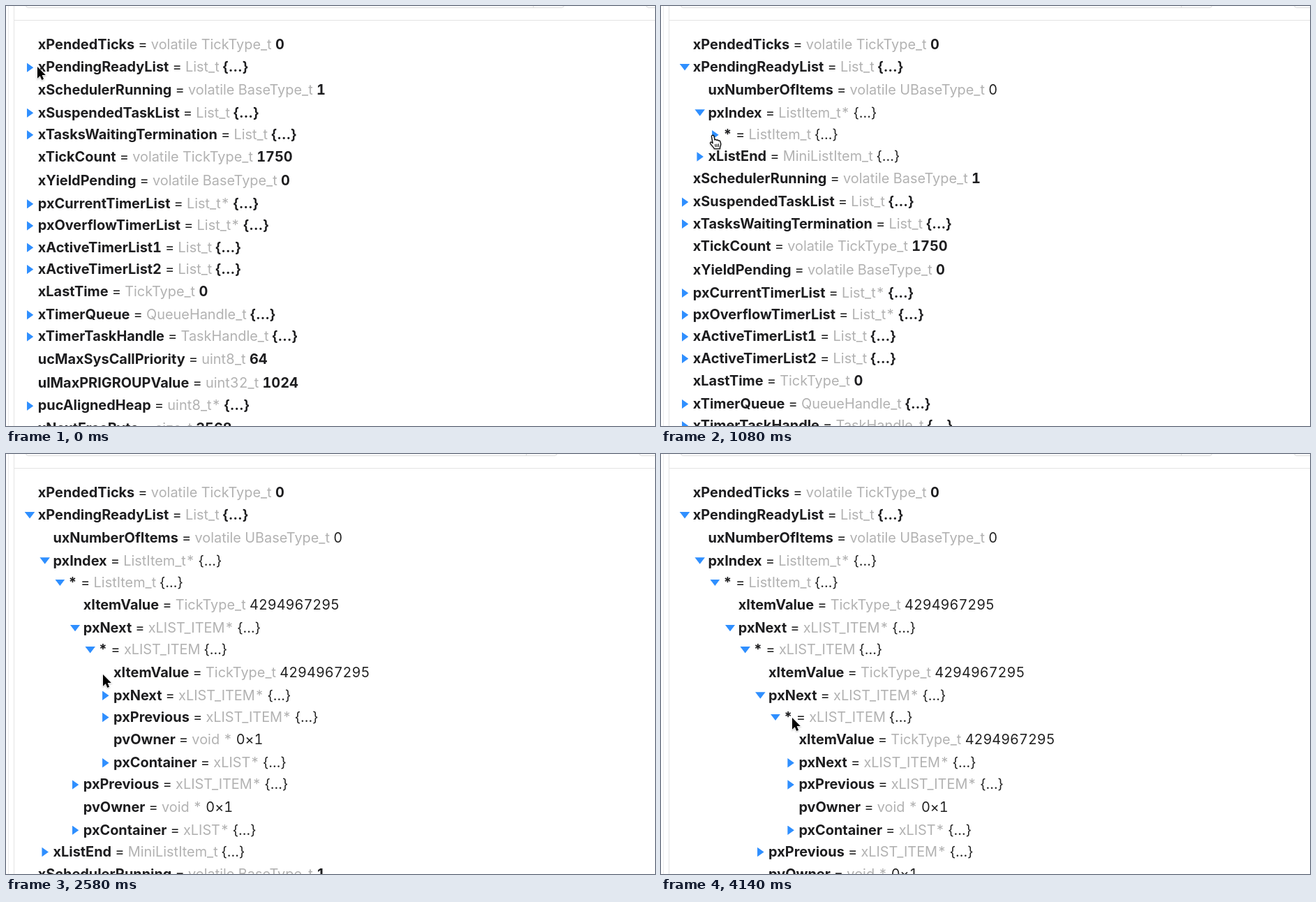
An HTML page for the animation above (4200 ms loop, 930 by 602 pixels).

```html
<!DOCTYPE html>
<html lang="en">
<head>
<meta charset="utf-8">
<title>Variable tree</title>
<style>
  html, body { margin: 0; width: 100%; height: 100%; overflow: hidden; background: #fff; }
  #stage { position: relative; width: 930px; height: 602px; overflow: hidden; background: #fff; }
  .line, .box { position: absolute; box-sizing: border-box; }
  .line { background: #e4e4e4; }
  .box { top: -30px; height: 33px; border: 1.5px solid #dcdcdc; border-radius: 4px; }
  #field { left: 28px; width: 772px; }
  #field i { position: absolute; right: 0; top: 0; bottom: 0; width: 43px; border-left: 1.5px solid #dcdcdc; }
  #side { left: 917px; width: 60px; }
  .narrow #field { width: 762px; }
  .narrow #side { left: 907px; }

  #tree {
    position: absolute; left: 45.8px; top: 38.5px; white-space: nowrap; color: #222;
    font: 400 19.9px Inter, "Open Sans", sans-serif;
    font-variant-numeric: tabular-nums;
    font-variant-ligatures: no-contextual;
  }
  .row { position: relative; height: 33.9px; line-height: 33.9px; }
  .parent { height: 31.3px; line-height: 31.3px; }
  .row b { font-weight: 700; color: #1d1d1f; }
  .type { color: #b2b2b2; }
  .kids { display: none; margin-left: 21.67px; }
  .open > .kids { display: block; }
  .parent::before {
    content: ""; position: absolute; left: -16px; top: 9px; width: 9.5px; height: 13.5px;
    background: #2f8fff; clip-path: polygon(0 0, 100% 50%, 0 100%);
  }
  .open > .parent::before {
    left: -19px; top: 10.7px; width: 14.5px; height: 9.5px;
    clip-path: polygon(0 0, 100% 0, 50% 100%);
  }
  #cursor { position: absolute; left: 0; top: 0; overflow: visible; filter: drop-shadow(0 1px 1px #0004); }
</style>
</head>
<body>
<div id="stage">
  <div class="line" style="left:3px;top:0;width:1px;height:602px;background:#ececec"></div>
  <div class="line" style="left:11px;top:0;width:1px;height:602px"></div>
  <div class="line" style="left:12px;top:20px;width:918px;height:1px"></div>
  <div class="box" id="field"><i></i></div>
  <div class="box" id="side"></div>
  <div id="tree"></div>
  <svg id="cursor" width="20" height="24">
    <path id="arrow" d="M0 0V16.8L3.8 13.2L6.3 19L9 17.8L6.6 12.1H11.8Z" fill="#000" stroke="#fff" stroke-width="1.3" paint-order="stroke"/>
    <g id="hand" transform="translate(-5 -1)" fill="#fff" stroke="#111" stroke-width="1.4" stroke-linejoin="round" stroke-linecap="round">
      <path d="M5 1.2C6.3 1 6.9 2 7.1 3L8 8C8.4 7 10.2 7.1 10.5 8.4C11.3 7.6 12.8 7.9 13.1 9.1C14.2 8.5 15.5 9.1 15.8 10.2L16.7 13.4C17 15.4 15.8 17 15.5 18.4V20.6H7.4C7 18.8 4 16.6 2 13.6C.8 11.9 2.3 10.4 3.7 11.5L5.2 12.8L3.5 3.4C3.3 2 4 1.3 5 1.2Z"/>
      <path d="M8.6 14.2L9 17.6M11 14L11.2 17.6M13.4 13.8V17.4" stroke-width="1.1"/>
    </g>
  </svg>
</div>
<script>
const LOOP = 4200, STEP = 60, NARROW_AT = 840;
const $ = id => document.getElementById(id);
const leaf = (name, type, value) => ({ name, type, value });
const node = (name, type, openAt = Infinity, kids = []) => ({ name, type, value: "{…}", openAt, kids });

const item = next => [
  leaf("xItemValue", "TickType_t", "4294967295"),
  next,
  node("pxPrevious", "xLIST_ITEM*"),
  leaf("pvOwner", "void *", "0×1"),
  node("pxContainer", "xLIST*")
];
const nextItem = (openAt, targetAt, next) =>
  node("pxNext", "xLIST_ITEM*", openAt, [node("*", "xLIST_ITEM", targetAt, item(next))]);

const chain = nextItem(1800, 2400, nextItem(3060, 3600, node("pxNext", "xLIST_ITEM*")));

const roots = [
  leaf("xPendedTicks", "volatile TickType_t", "0"),
  node("xPendingReadyList", "List_t", 300, [
    leaf("uxNumberOfItems", "volatile UBaseType_t", "0"),
    node("pxIndex", "ListItem_t*", 840, [node("*", "ListItem_t", 1260, item(chain))]),
    node("xListEnd", "MiniListItem_t")
  ]),
  leaf("xSchedulerRunning", "volatile BaseType_t", "1"),
  node("xSuspendedTaskList", "List_t"),
  node("xTasksWaitingTermination", "List_t"),
  leaf("xTickCount", "volatile TickType_t", "1750"),
  leaf("xYieldPending", "volatile BaseType_t", "0"),
  node("pxCurrentTimerList", "List_t*"),
  node("pxOverflowTimerList", "List_t*"),
  node("xActiveTimerList1", "List_t"),
  node("xActiveTimerList2", "List_t"),
  leaf("xLastTime", "TickType_t", "0"),
  node("xTimerQueue", "QueueHandle_t"),
  node("xTimerTaskHandle", "TaskHandle_t"),
  leaf("ucMaxSysCallPriority", "uint8_t", "64"),
  leaf("ulMaxPRIGROUPValue", "uint32_t", "1024"),
  node("pucAlignedHeap", "uint8_t*"),
  leaf("xNextFreeByte", "size_t", "3568")
];

const toggles = [];

function add(tag, cls, parent, text = "") {
  const el = document.createElement(tag);
  el.className = cls;
  el.textContent = text;
  parent.append(el);
  return el;
}

function build(data, parent, depth) {
  const box = add("div", "", parent);
  const row = add("div", data.kids ? "row parent" : "row", box);
  add("b", "", row, data.name);
  row.append(" = ");
  add("span", "type", row, data.type);
  row.append(" ");
  add(depth ? "span" : "b", "", row, data.value);
  if (!data.kids) return;
  const kids = add("div", "kids", box);
  data.kids.forEach(kid => build(kid, kids, depth + 1));
  if (data.openAt < LOOP) toggles.push([box, data.openAt]);
}
roots.forEach(root => build(root, $("tree"), 0));

// Pointer stops: arrival, departure, x, y, hand shape
const stops = [
  [0, 0, 45, 87, false],
  [120, 420, 37, 88, true],
  [600, 900, 58, 153, true],
  [1020, 1320, 74, 185, true],
  [1560, 1980, 102, 250, true],
  [2220, 2460, 123, 282, true],
  [2580, 2580, 139, 316, false],
  [2760, 3240, 144, 345, true],
  [3420, 3720, 166, 378, true],
  [4140, LOOP, 188, 378, false]
];

function pointer(t) {
  const i = stops.findLastIndex(stop => t >= stop[0]);
  const [, leave, x, y, hand] = stops[i];
  if (t <= leave) return { x, y, hand };
  const [arrive, , nx, ny] = stops[i + 1];
  const p = (t - leave) / (arrive - leave);
  const ease = p * p * (3 - 2 * p);
  return { x: x + (nx - x) * ease, y: y + (ny - y) * ease, hand: false };
}

function draw(now) {
  const t = Math.floor((now % LOOP) / STEP) * STEP;
  for (const [box, at] of toggles) box.classList.toggle("open", t >= at);
  $("stage").classList.toggle("narrow", t >= NARROW_AT);
  const { x, y, hand } = pointer(t);
  $("cursor").style.transform = `translate(${x}px, ${y}px)`;
  $("hand").style.display = hand ? "" : "none";
  $("arrow").style.display = hand ? "none" : "";
}

const start = performance.now();
function frame() {
  draw(performance.now() - start);
  requestAnimationFrame(frame);
}
frame();
</script>
</body>
</html>
```
